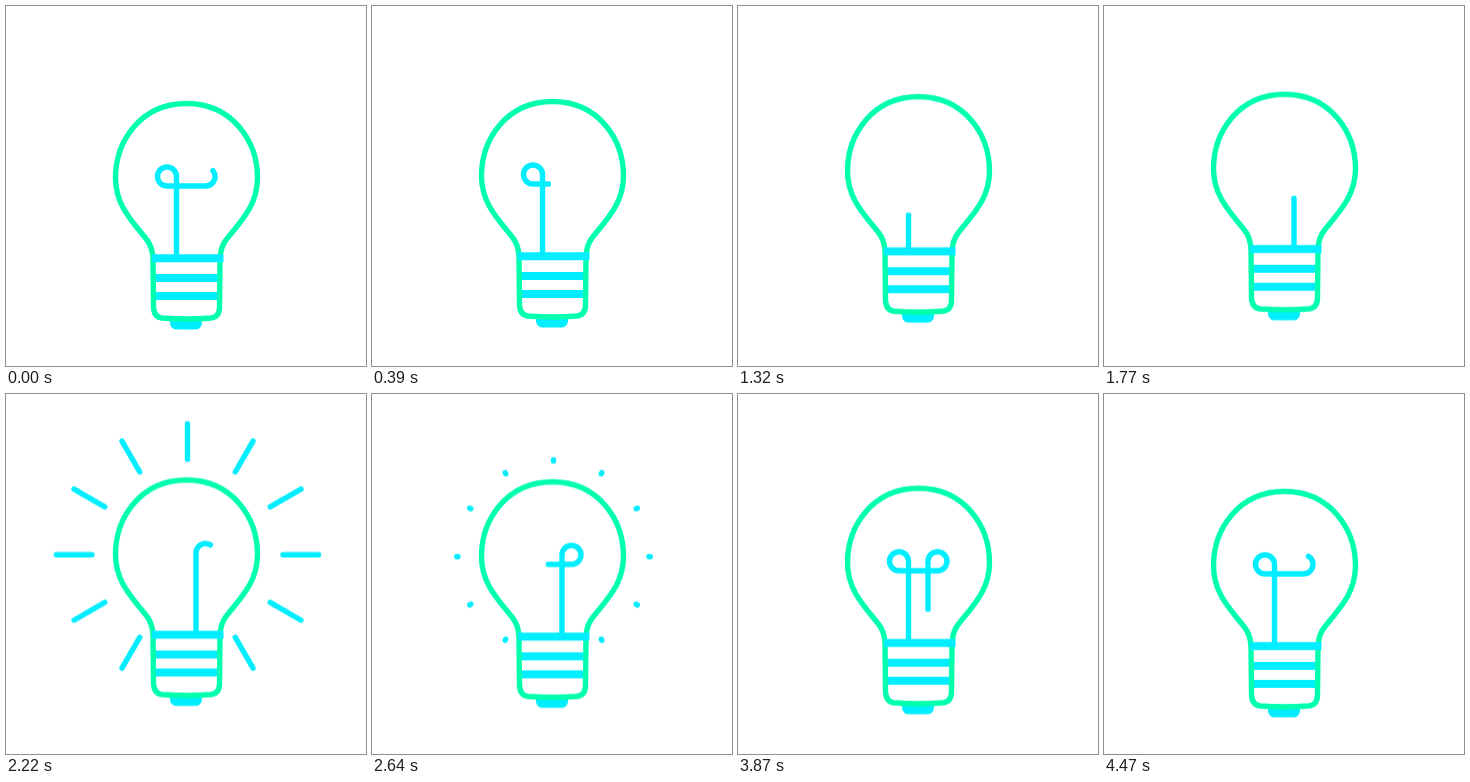
An HTML page for the animation above (4500 ms loop, 360x360 px).

```html
<!DOCTYPE html>
<html lang="en">
<head>
<meta charset="utf-8">
<title>Light bulb</title>
<style>
  html, body { margin: 0; width: 100%; height: 100%; overflow: hidden; background: #fff; }
  svg { display: block; width: 100%; height: 100%; }
  .line { fill: none; stroke: #00eeff; stroke-width: 5.4; stroke-linecap: round; stroke-linejoin: round; }
  .glass { stroke: #00ffae; }
  .bar { stroke-width: 8; stroke-linecap: butt; }
  .cap { fill: #00eeff; }
  .bulb { animation: bob 4.5s linear infinite; }
  .wire { stroke-dasharray: 255; animation: run 4.5s linear infinite; }
  .rays { stroke-dasharray: 36 40; animation: shine 4.5s cubic-bezier(.333, 0, .667, 1) infinite; }

  @keyframes bob { 50% { transform: translateY(-11.7px); } }
  @keyframes run {
    from { stroke-dashoffset: 69.3px; }
    to { stroke-dashoffset: 579.3px; }
  }
  @keyframes shine {
    0%, 40%, 60%, 100% { stroke-dashoffset: 36.5px; }
    50% { stroke-dashoffset: 0px; }
  }
</style>
</head>
<body>
<svg viewBox="0 0 360 360">
  <g class="bulb">
    <path class="line rays" id="rays"/>
    <path class="line wire" d="M170.5 252V170.5A9.5 9.5 0 1 0 161 180H199.5A9.5 9.5 0 1 0 190 170.5V252"/>
    <path class="cap" d="M164 313H196V317.5Q195 323.5 189 323.5H171Q165 323.5 164 317.5Z"/>
    <path class="line bar" d="M148 272H213M148 290H213"/>
    <path class="line glass" d="M147 252C146.500 244 144.500 238.500 141 234C127 216 109.500 200 109.500 172C109.500 136 134 97.500 180.500 97.500C227 97.500 251.500 136 251.500 172C251.500 200 234 216 220 234C216.500 238.500 214.500 244 214 252L213.500 301Q213.500 311 205 312Q180.500 314 156 312Q148 311 147.500 301Z"/>
    <path class="line bar" d="M146 252.300H217.500"/>
  </g>
</svg>
<script>
  const CX = 181.5, CY = 172.2, INNER = 95.5, OUTER = 131.5;

  const point = (angle, r) =>
    `${(CX + r * Math.cos(angle)).toFixed(2)} ${(CY + r * Math.sin(angle)).toFixed(2)}`;

  // Eleven rays, 30 degrees apart, leaving out the one over the socket.
  const rays = Array.from({ length: 11 }, (_, i) => {
    const angle = (120 + i * 30) * Math.PI / 180;
    return `M${point(angle, INNER)}L${point(angle, OUTER)}`;
  });
  document.getElementById('rays').setAttribute('d', rays.join(''));
</script>
</body>
</html>
```
